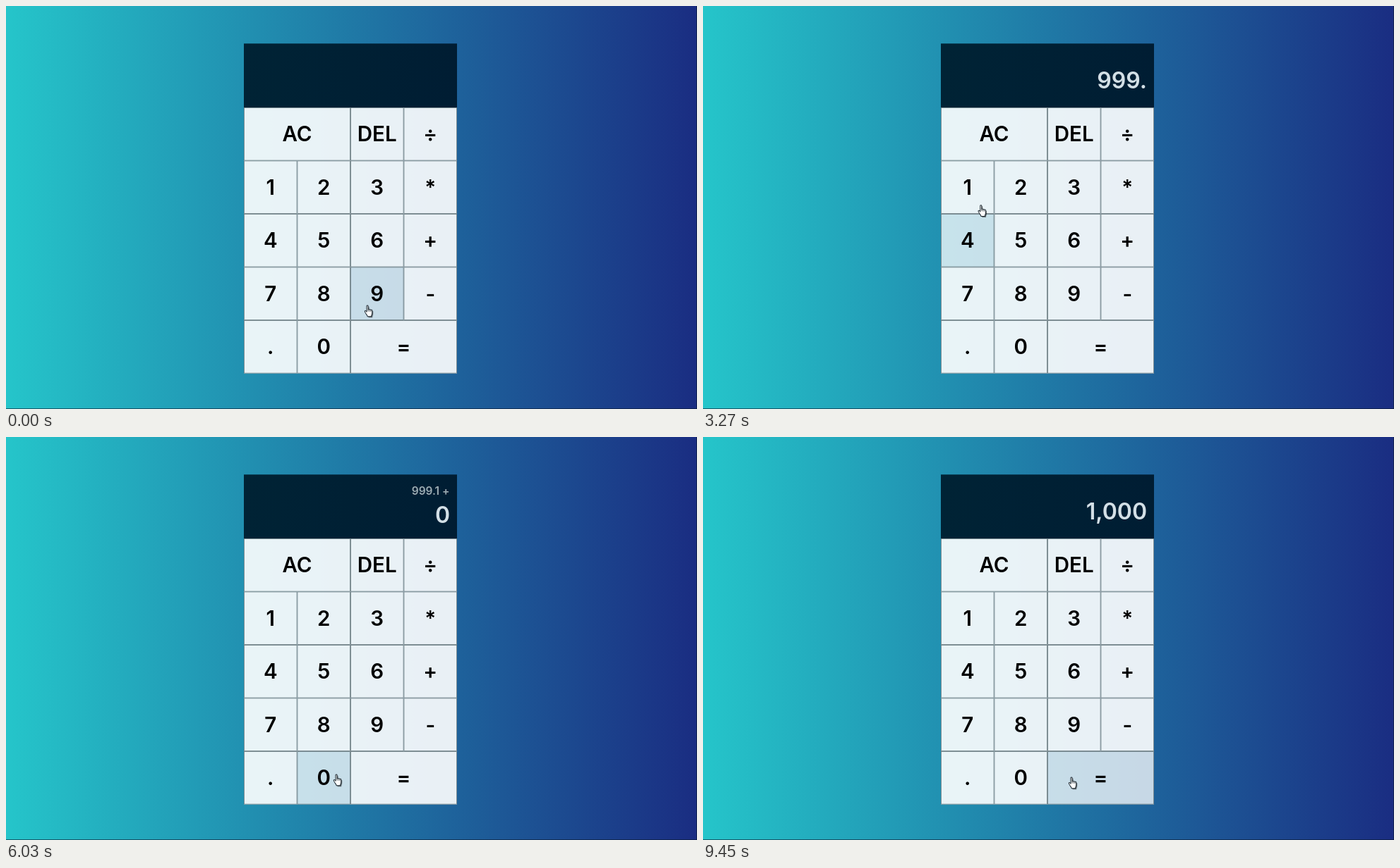
Animation, 979 px wide and 572 px high, one loop 9790 ms. Source, as an HTML page:

```html
<!DOCTYPE html>
<html lang="en">
<head>
<meta charset="utf-8">
<title>Calculator</title>
<style>
  html, body { margin: 0; width: 100%; height: 100%; overflow: hidden; }
  svg { position: fixed; inset: 0; width: 100%; height: 100%; display: block; }
  text { font-family: Inter, "Open Sans", sans-serif; font-weight: 600; }
  #keys text { font-size: 29.5px; text-anchor: middle; }
  #current, #previous { text-anchor: end; }
  #current { font-size: 32px; fill: #d3dfe6; }
  #previous { font-size: 15.5px; fill: #9dacb3; }
</style>
</head>
<body>
<svg viewBox="0 0 979 572" preserveAspectRatio="none">
  <defs>
    <linearGradient id="sea">
      <stop offset="0" stop-color="#25c5ca"/>
      <stop offset="1" stop-color="#1a2d82"/>
    </linearGradient>
    <linearGradient id="screen">
      <stop offset="0" stop-color="#002335"/>
      <stop offset="1" stop-color="#001d33"/>
    </linearGradient>
    <filter id="soft" x="-50%" y="-50%" width="200%" height="200%">
      <feGaussianBlur stdDeviation="0.9"/>
    </filter>
    <path id="hand" d="M5.5 1.5c0-1.4 2.6-1.4 2.6 0v6.4c.3-1 2.3-.9 2.5.5 .4-.8 2.3-.7 2.5.6 .5-.7 2.4-.4 2.4 1V14c0 3-1.5 4-1.5 7H7c0-2-2.5-4-4.5-8-1-2-.5-2.8.5-2.8 1 0 2 1.3 2.5 2.3z"/>
  </defs>
  <rect width="979" height="572" fill="url(#sea)"/>
  <path d="M0 571.5H979M978.5 0V572" stroke="#0a1a30" stroke-opacity=".6"/>
  <rect x="337" y="53.3" width="302" height="90.7" fill="url(#screen)"/>
  <text id="previous" x="628.5"></text>
  <text id="current" x="629"></text>
  <g id="keys"></g>
  <g id="cursor">
    <g transform="scale(.77) translate(-6.75 -.5)">
      <use href="#hand" x="2" y="2" opacity=".5" filter="url(#soft)"/>
      <use href="#hand" fill="#fff" stroke="#1c2830" stroke-width="1.3" stroke-linejoin="round"/>
      <path d="M8.1 8v3.5M10.6 8.8v2.9M13.1 9.4v2.6" fill="none" stroke="#1c2830"/>
    </g>
  </g>
</svg>
<script>
const NS = 'http://www.w3.org/2000/svg';
const LOOP = 9790, HOVER_LAG = 40;
const LEFT = 337, TOP = 144, CELL = 75.5;
const $ = id => document.getElementById(id);

function add(parent, tag, attrs) {
  const el = parent.appendChild(document.createElementNS(NS, tag));
  for (const k in attrs) el.setAttribute(k, attrs[k]);
  return el;
}

// One string per row; a repeated label spans two columns
const rows = ['AC AC DEL ÷', '1 2 3 *', '4 5 6 +', '7 8 9 -', '. 0 = ='].map(r => r.split(' '));
const keys = [];
rows.forEach((row, r) => row.forEach((label, c) => {
  if (row[c - 1] === label) return;
  const w = CELL * (row[c + 1] === label ? 2 : 1);
  const x = LEFT + c * CELL, y = TOP + r * CELL;
  const face = add($('keys'), 'rect', { x, y, width: w, height: CELL, fill: '#fff' });
  add($('keys'), 'rect', { x: x + .4, y: y + .4, width: w - .8, height: CELL - .8,
    fill: 'none', stroke: '#65767c', 'stroke-width': .8 });
  add($('keys'), 'text', { x: x + w / 2, y: y + 48.2 }).textContent = label;
  keys.push({ x, y, w, face });
}));

// Pointer moves: start, end, target x, target y
const home = [512, 425];
const moves = [
  [1870, 2430, 390, 484],
  [2750, 3370, 394, 268],
  [3760, 4430, 540, 325],
  [4610, 4800, 597, 337],
  [5050, 5750, 468, 479],
  [6270, 6800, 388, 485],
  [7230, 7740, 512, 431],
  [8200, 8600, 522, 483]
];

// Display: time, current, current baseline, previous, previous baseline
const shows = [
  [0, '', 117, '', 0],
  [1090, '9', 117, '', 0],
  [1385, '99', 117, '', 0],
  [1680, '999', 117, '', 0],
  [2620, '999.', 117, '', 0],
  [3620, '999.1', 117, '', 0],
  [4910, '', 117, '999.1 +', 91],
  [6030, '0', 122, '999.1 +', 81.7],
  [7130, '0.', 122, '999.1 +', 81.7],
  [8050, '0.9', 122, '999.1 +', 81.7],
  [9010, '1,000', 117, '', 0]
];

const ease = u => u * u * (3 - 2 * u);

function pointerAt(t) {
  let [x, y] = home;
  for (const [from, to, tx, ty] of moves) {
    if (t <= from) break;
    const k = ease(Math.min(1, (t - from) / (to - from)));
    x += (tx - x) * k;
    y += (ty - y) * k;
  }
  return [x, y];
}

function render(t) {
  const [x, y] = pointerAt(t);
  $('cursor').setAttribute('transform', `translate(${x.toFixed(2)} ${y.toFixed(2)})`);

  const [hx, hy] = pointerAt(t - HOVER_LAG);
  for (const k of keys) {
    const over = hx >= k.x && hx < k.x + k.w && hy >= k.y && hy < k.y + CELL;
    k.face.setAttribute('fill-opacity', over ? .75 : .9);
  }

  const [, current, cy, previous, py] = shows.filter(s => s[0] <= t).pop();
  $('current').textContent = current;
  $('current').setAttribute('y', cy);
  $('previous').textContent = previous;
  $('previous').setAttribute('y', py);
}

const began = performance.now();
function tick() {
  render((performance.now() - began) % LOOP);
  requestAnimationFrame(tick);
}
tick();
</script>
</body>
</html>
```
